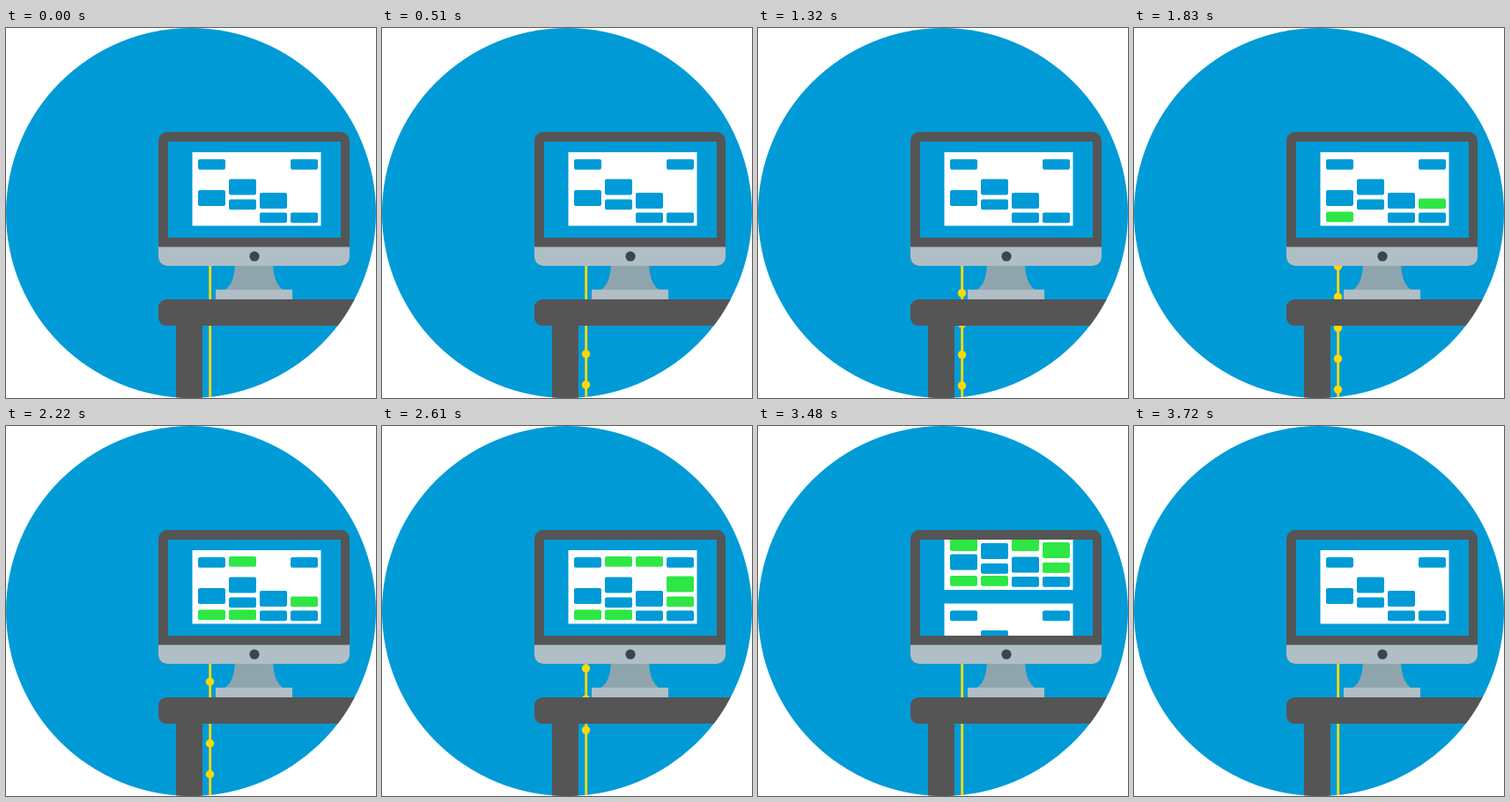
Animation, 420 px wide and 420 px high, one loop 3750 ms. Source, as an HTML page:

```html
<!DOCTYPE html>
<html lang="en">
<head>
<meta charset="utf-8">
<style>
  html, body { margin: 0; width: 100%; height: 100%; overflow: hidden; background: #fff; }
  svg { display: block; width: 100vw; height: 100vh; }
</style>
</head>
<body>
<svg viewBox="0 0 420 420">
  <defs>
    <clipPath id="stage"><circle cx="210" cy="210" r="210"/></clipPath>
    <clipPath id="screen"><rect x="184" y="129" width="196" height="109"/></clipPath>
  </defs>
  <g clip-path="url(#stage)">
    <rect width="420" height="420" fill="#009bd6"/>
    <path d="M231.700 265V420" stroke="#fddc0b" stroke-width="2.800"/>
    <g id="dots" fill="#fdd70b"></g>
    <rect x="193" y="330" width="30" height="90" fill="#555"/>
    <rect x="173" y="308" width="260" height="30" rx="9" fill="#555"/>
    <path d="M260 268H303Q304 292 316 298H247Q259 292 260 268Z" fill="#8fa5ad"/>
    <rect x="238" y="297" width="87" height="11" fill="#b0bec5"/>
    <rect x="173" y="118" width="217" height="152" rx="10" fill="#555"/>
    <path d="M173 248.500h217V260a10 10 0 0 1-10 10H183a10 10 0 0 1-10-10Z" fill="#b0bec5"/>
    <circle cx="282" cy="259.200" r="5.600" fill="#37474f"/>
    <rect x="184" y="129" width="196" height="109" fill="#009bd6"/>
    <g clip-path="url(#screen)"><g id="pages"></g></g>
  </g>
</svg>
<script>
const LOOP = 3750, STEP = 30;
const DOT_SPEED = 0.1285, DOT_GAP = 35, DOT_START = 435.5, DOT_END = 260;
const FILL_START = 1345, FILL_GAP = 243, FILL_TIME = 40;
const SCROLL_START = 3300, SCROLL_TIME = 420, PAGE_GAP = 99;

// Cells of the 4 x 4 board, counted row by row, in the order they turn green.
const fillOrder = [12, 11, 13, 1, 2, 7, 4, 6];

const clamp = v => Math.min(1, Math.max(0, v));
const pages = document.getElementById('pages');
const dotLayer = document.getElementById('dots');

function add(parent, tag, attrs) {
  const el = document.createElementNS('http://www.w3.org/2000/svg', tag);
  for (const key in attrs) el.setAttribute(key, attrs[key]);
  return parent.appendChild(el);
}

// Odd columns hold one tall block, even columns two; green blocks sit 1px higher.
function addBlock(cell, top, green) {
  const row = Math.floor(cell / 4), col = cell % 4, odd = col % 2;
  const rowY = [149, odd ? 171.5 : 163.5, odd ? 194.5 : 184 + 1.5 * col, 209.5][row];
  const tall = row === 1 || (row === 2 && !odd);
  return add(pages, 'rect', {
    x: 218 + 35 * col, y: rowY + top - green, width: 31, height: tall ? 18 : 11.8,
    rx: 2, fill: green ? '#2ee745' : '#009bd6'
  });
}

for (const top of [0, PAGE_GAP]) {
  add(pages, 'rect', { x: 211.5, y: 141 + top, width: 146, height: 83.5, fill: '#fff' });
  for (let cell = 0; cell < 16; cell++) {
    if (!fillOrder.includes(cell)) addBlock(cell, top, 0);
  }
}
const fills = fillOrder.map(cell => addBlock(cell, 0, 1));
const dots = fillOrder.map(() => add(dotLayer, 'circle', { cx: 231.5, r: 4.7 }));

function draw(t) {
  dots.forEach((dot, i) => {
    dot.setAttribute('cy', Math.max(DOT_END, DOT_START + i * DOT_GAP - t * DOT_SPEED));
  });
  fills.forEach((block, i) => {
    block.setAttribute('opacity', clamp((t - FILL_START - i * FILL_GAP) / FILL_TIME));
  });
  const p = clamp((t - SCROLL_START) / SCROLL_TIME);
  const scroll = PAGE_GAP * (1 - Math.cos(Math.PI * p)) / 2;
  pages.setAttribute('transform', `translate(0 ${-scroll})`);
}

const start = performance.now();
function tick() {
  const t = (performance.now() - start) % LOOP;
  draw(Math.floor(t / STEP) * STEP);
  requestAnimationFrame(tick);
}
tick();
</script>
</body>
</html>
```
